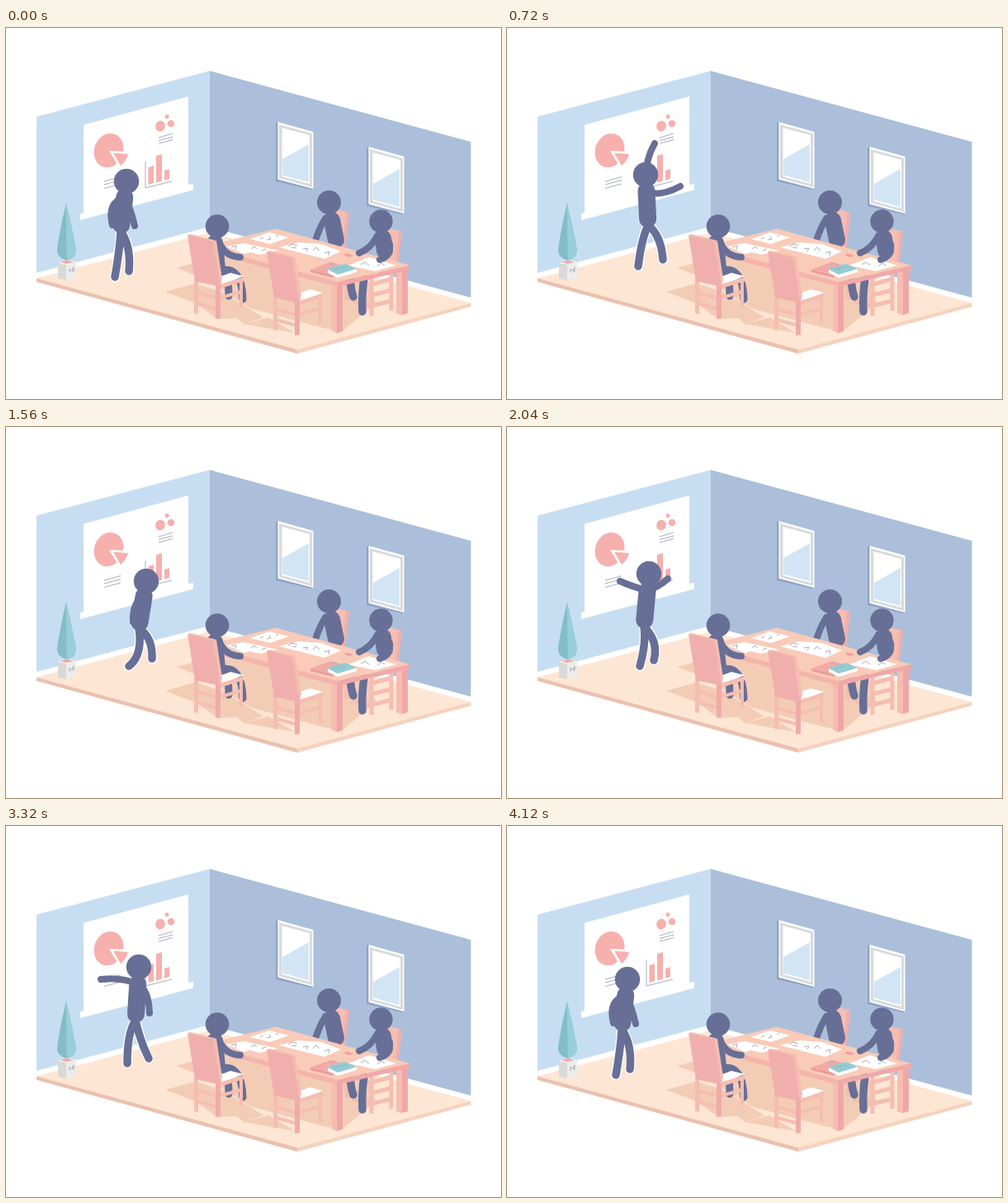
Write an HTML page that moves like this. It is 600 px wide and 450 px high and loops after 4.44 s.

```html
<!DOCTYPE html>
<html lang="en">
<head>
<meta charset="utf-8">
<title>Meeting room presentation</title>
<style>
html, body { margin: 0; width: 100%; height: 100%; overflow: hidden; background: #fff }
svg { display: block; width: 600px; height: 450px }
.person { fill: none; stroke: #676f97; stroke-linecap: round; stroke-linejoin: round }
.person circle { fill: #676f97; stroke: none }
.line { fill: none; stroke: #a9adb9; stroke-width: 1 }
.halo { stroke: #fff; stroke-width: 12 }
</style>
</head>
<body>
<svg viewBox="0 0 600 450">
  <defs>
    <g id="window">
      <path fill="#8fa3c8" d="M327 115L330 114V184L372 195L370 196L327 186Z"/>
      <path fill="#fff" d="M329.500 114L372.500 126V195L329.500 183.500Z"/>
      <path fill="#d9dadb" d="M331 117L371 128V193L331 182Z"/>
      <path fill="#fff" d="M334.500 121L368 130V189L334.500 180Z"/>
      <path fill="#d2e5f5" d="M335 159L367 141V187L335 178.500Z"/>
    </g>
    <g id="chair">
      <path fill="none" stroke="#f6bdb1" stroke-width="4" d="M232 321L257 328L285 320M232 334L257 341M260 313L285 306V339"/>
      <path fill="#f6bdb1" d="M228 304H233V347L228 346Z"/>
      <path fill="#fff" d="M256 303L272 297L288 301L261 312Z"/>
      <path fill="#f6bdb1" d="M259 311L288 302V307L260 316Z"/>
      <path fill="#f0abab" d="M254 305H260V352L254 353Z"/>
      <path fill="#f6bdb1" d="M220 251L224 250L255 258L251 260Z"/>
      <path fill="#f0afad" d="M220 251L252 259L260 314L229 307Z"/>
      <path fill="#f6bdb1" d="M251 259L255 258L262 304L260 314Z"/>
    </g>
  </defs>

  <!-- room -->
  <path fill="#fff" d="M37 296L247 241L563 326V334L353 390L37 304Z"/>
  <path fill="#c7def2" d="M37 107.500L247 52V241L37 297Z"/>
  <path fill="#abbfda" d="M247 52L563.500 138V327L247 241.500Z"/>
  <path fill="#fde6d3" d="M37 303.500L247 248L563.500 333.500L353 390Z"/>
  <path fill="#ebc0ae" d="M37 303.500L353 390V395L37 308Z"/>
  <path fill="#f6d2be" d="M353 390L563.500 333.500V338L353 395Z"/>
  <path fill="#f3ccb6" d="M206 291L262 276L300 270L440 308L448 334L407 368L385 364L340 352L296 340L240 304Z
    M193 320L229 310L262 320L312 351L288 359L280 352L256 353L230 334Z M288 359L318 351L350 370L328 366Z"/>

  <!-- screen -->
  <path fill="#fff" d="M94 117.500L221 83V190L227 189V196.500L90 233V225.500L94 224Z"/>
  <g fill="#f6b0ae">
    <ellipse cx="124.500" cy="148.500" rx="17.500" ry="21" transform="rotate(20 124.500 148.500)"/>
    <path fill="#fff" d="M125 149L150 150V172H139Z"/>
    <path d="M130 151.500L148 153Q146 161 139 167Z"/>
    <ellipse cx="187" cy="119" rx="5.800" ry="6.500" transform="rotate(20 187 119)"/>
    <circle cx="200" cy="116" r="4.300"/>
    <circle cx="195" cy="107.500" r="2.500"/>
    <path d="M172.500 169L179 167V188L172.500 190ZM182 155L189 153V185.500L182 187.500ZM192 173L198 171V183L192 184.500Z"/>
  </g>
  <path class="line" d="M185 133L202 128M185 136.500L202 132M185 140L202 135.500M119 186L139 180.500M119 190L139 184.500M119 194.500L139 189M169 162V194L201 186"/>

  <use href="#window"/>
  <use href="#window" x="110" y="30"/>

  <!-- plant -->
  <path fill="#d9d9d7" d="M63 285L73 287V306L63 304Z"/>
  <path fill="#ececea" d="M73 287L85 284V303L73 306Z"/>
  <path fill="#f7f6f3" d="M63 285L74 281L85 284L73 287Z"/>
  <path fill="#f0a9a4" d="M66 284L74 281.500L82 284L73 286Z"/>
  <path fill="#98ced7" d="M73 212Q80 240 85 268Q86 279 74 282Z"/>
  <path fill="#83bdca" d="M73 212Q66 240 62 268Q61 279 74 282Z"/>
  <path class="line" d="M77 297V292L80 295L82 290V296"/>

  <!-- presenter -->
  <g class="person">
    <path id="halo" class="halo"/>
    <path id="legs" stroke-width="9.500"/>
    <path id="torso" stroke-width="21"/>
    <path id="arms" stroke-width="8"/>
    <circle id="head" r="15.200"/>
  </g>

  <!-- far chairs and sitters -->
  <path fill="#f6bdb1" d="M396 218L416 224L411 269L398 271Z"/>
  <path fill="#f0afad" d="M412 223L416 224L411 269L408 270Z"/>
  <path fill="#f6bdb1" d="M460 242L480 247L474 294L460 296Z"/>
  <path fill="#f0afad" d="M476 246L480 247L474 294L471 295Z"/>
  <path fill="none" stroke="#f6bdb1" stroke-width="5" d="M413 305V330M443 300V349M467 296V343M440 312L468 304M443 324L467 318M443 337L467 331M420 331L443 337"/>
  <g class="person">
    <circle cx="391.500" cy="211.500" r="14.500"/>
    <path stroke-width="20" d="M395 233L400 257"/>
    <path stroke-width="8" d="M387 231Q379 244 375 258M402 245L401 267"/>
    <path stroke-width="9.500" d="M417 303Q418 318 421 326M434 304Q431 323 432 344"/>
  </g>

  <!-- table -->
  <path fill="#f0a6a8" d="M395 309H408V368L401 370L395 367ZM473 289H487V346L480 348L473 346Z"/>
  <path fill="#f6bdb1" d="M395 309H401V370L395 367ZM473 289H480V348L473 346Z"/>
  <path fill="#f9cbb8" d="M240 265L327 243.500L490 288L402 308Z"/>
  <path fill="#f4b4aa" d="M240 265L402 308V314L240 271Z"/>
  <path fill="#f0a8a8" d="M402 308L490 288V293L402 314Z"/>
  <path fill="#fff" d="M296 256L319 248L343 254L320 262ZM267 265L288 261L330 270L308 275L296 272L288 274ZM331 266L354 260L382 262L406 271L386 280ZM415 288L440 278L473 288L447 295Z"/>
  <path class="line" d="M308 256L312 254M316 257L321 256L319 253M327 253L330 251M273 266L279 264L278 269M297 268L301 265L304 268M310 270L315 268M342 265L347 262L353 264M346 266L352 267M360 268L366 267L364 271M372 270L376 266L380 270M386 273L392 271L391 276M430 287L435 284L440 288M450 289L455 285L459 288"/>
  <path fill="#ee9e9f" d="M409 275L413 273.500L421 276L416 278Z"/>
  <path fill="#e99a9b" d="M369 293L397 300V303L369 296Z"/>
  <path fill="#f3aaa5" d="M369 293L393 284L417 290L397 300Z"/>
  <path fill="#fff" d="M390 293L402 299L425 292V296L402 303L390 297Z"/>
  <path fill="#91cdd5" d="M389 292L411 286L425 292L402 299Z"/>
  <path class="line" d="M392 287L397 285L401 288M397 293L411 290"/>

  <g class="person">
    <circle cx="454.500" cy="234.500" r="14.200"/>
    <path stroke-width="20" d="M457 255L459 270"/>
    <path stroke-width="8" d="M450 252Q442 268 428 273M465 262Q467 277 453 281"/>
  </g>

  <!-- near sitter and chairs -->
  <g class="person">
    <circle cx="256" cy="240.500" r="14.300"/>
    <path stroke-width="20" d="M253 261L256 292"/>
    <path stroke-width="8" d="M258 258Q264 277 284 278"/>
    <path stroke-width="9" d="M258 295Q270 290 270 325M260 294Q286 288 287 329"/>
  </g>
  <use href="#chair"/>
  <use href="#chair" x="96" y="20"/>
</svg>
<script>
const LOOP = 4440, STEP = 40;
const mix = (a, b, u) => a.map((v, i) => v + (b[i] - v) * u);

// head, hip, then bend and end of each arm, then of each leg
const stand = [146,186, 139,246, 122,212, 129,239, 150,215, 156,240, 138,268, 132,302, 152,265, 149,295];
const reach = [168,178, 171,239, 165,164, 179,140, 184,206, 210,192, 163,256, 159,289, 187,252, 189,281];
const stoop = [170,187, 161,244, 153,212, 154,236, 162,214, 165,234, 166,277, 149,290, 178,255, 177,281];
const spread = [172,178, 166,242, 150,193, 137,187, 184,194, 195,184, 169,262, 161,290, 184,260, 178,283];
const open = [153,174, 154,236, 129,190, 118,212, 175,198, 175,224, 145,256, 146,289, 163,264, 177,279];
const point = [161,171, 157,236, 140,183, 115,186, 173,198, 174,227, 147,250, 147,288, 163,262, 173,282];

const step = mix(stand, reach, .55), lower = mix(reach, stoop, .35);
const rise = mix(stoop, spread, .3), turn = mix(spread, open, .25), drop = mix(point, stand, .35);
const keys = [
  [0, stand], [320, step], [440, step], [720, reach], [840, reach], [1120, lower], [1400, lower],
  [1560, stoop], [1680, rise], [1840, rise], [2040, spread], [2160, turn], [2400, turn],
  [2640, open], [2840, open], [3040, point], [3320, point], [3520, drop], [3720, drop],
  [4120, stand], [LOOP, stand]
];

function poseAt(t) {
  const i = keys.findIndex(k => k[0] > t);
  const [t0, a] = keys[i - 1], [t1, b] = keys[i];
  const u = (t - t0) / (t1 - t0);
  return mix(a, b, u * u * (3 - 2 * u));
}

const el = id => document.getElementById(id);
const setPath = (id, d) => el(id).setAttribute("d", d);

function draw(now) {
  const p = poseAt(Math.floor(now % LOOP / STEP) * STEP);
  const head = p.slice(0, 2), hip = p.slice(2, 4);
  const limb = (from, i) => `M${from}Q${p.slice(i, i + 4)}`;
  const shoulder = mix(head, hip, .32);
  const legs = limb(hip, 12) + limb(hip, 16);
  setPath("halo", legs);
  setPath("legs", legs);
  setPath("torso", `M${shoulder}L${mix(head, hip, .88)}`);
  setPath("arms", limb(shoulder, 4) + limb(shoulder, 8));
  el("head").setAttribute("cx", head[0]);
  el("head").setAttribute("cy", head[1]);
  requestAnimationFrame(draw);
}
requestAnimationFrame(draw);
</script>
</body>
</html>
```
